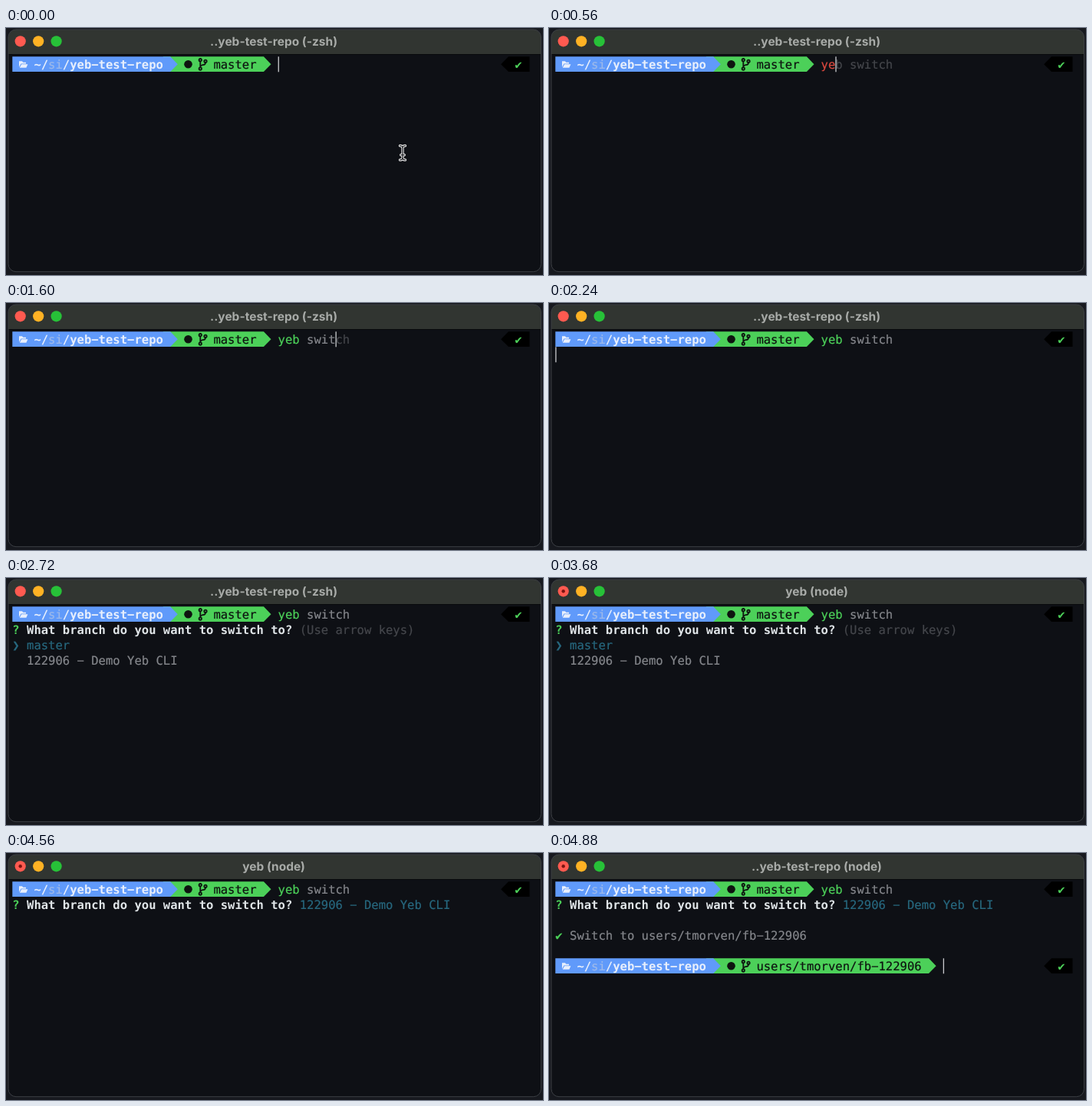
An HTML page for the animation above (5120 ms loop, 700 by 322 pixels).

```html
<!DOCTYPE html>
<html lang="en">
<head>
<meta charset="utf-8">
<title>Terminal branch switch</title>
<style>
  html, body { margin: 0; width: 100%; height: 100%; overflow: hidden; background: #17191f; }
  svg { display: block; }
  text { white-space: pre; text-rendering: geometricPrecision; }
  .mono { font: 15.55px "DejaVu Sans Mono", monospace; }
  .bold { font-weight: 700; }
  #title { font: 700 15.5px Inter, sans-serif; fill: #a8aba8; text-anchor: middle; }
</style>
</head>
<body>
<svg width="700" height="322" viewBox="0 0 700 322">
  <defs>
    <path id="beam" d="M513.5 153.5q3.5 0 3.5 3V169q0 3-3.5 3M520.5 153.5q-3.5 0-3.5 3V169q0 3 3.5 3M514.7 165.5h4.6"/>
  </defs>
  <rect x="3" y="2" width="694.5" height="315.7" rx="10" fill="#0e1015"/>
  <path d="M3 34V12a10 10 0 0 1 10-10H687.5a10 10 0 0 1 10 10V34Z" fill="#313531"/>
  <path d="M3 34.5H697.5" stroke="#08090b"/>
  <rect x="3" y="2" width="694.5" height="315.7" rx="10" fill="none" stroke="#3c3f44"/>
  <circle cx="18.7" cy="17.3" r="7.1" fill="#ff5a50"/>
  <circle id="dot" cx="18.7" cy="17.3" r="2.2" fill="#7a1410"/>
  <circle cx="42.2" cy="17.3" r="7.1" fill="#ffb224"/>
  <circle cx="65.6" cy="17.3" r="7.1" fill="#27c138"/>
  <text id="title" x="349" y="22.5"></text>
  <g id="screen"></g>
  <g id="mouse" fill="none" stroke-linecap="round">
    <use href="#beam" stroke="#e4e4e4" stroke-width="3.4"/>
    <use href="#beam" stroke="#15171b" stroke-width="1.2"/>
  </g>
</svg>
<script>
const LOOP = 5120, CELL = 9.36, LINE = 20;
const GREEN = '#4cd059', BLUE = '#609afa', GRAY = '#85878c', DIM = '#45474c', INK = '#0e1410',
      TEAL = '#27687f', WHITE = '#e0e5e8', PALE = '#e8effc', RED = '#d8483f';
const TOOL = 'yeb', COMMAND = 'yeb switch', REPO = 'yeb-test-repo';
const TASK = '122906 − Demo Yeb CLI', BRANCH = 'users/tmorven/fb−122906';
// Times at which each character of the command is typed.
const KEYS = [240, 560, 640, 800, 1200, 1440, 1520, 1600, 1840, 1920];
const ENTER = 2240, MENU = 2720, RENAME = 2880, MOVE = 3760, ANSWER = 4480, DONE = 4640;

const $ = id => document.getElementById(id);
const colX = col => 8.3 + col * CELL;
const rowY = row => 37.3 + row * LINE;

// A hairline stroke in the text colour gives the strokes their smoothed weight.
const write = (col, row, str, fill, bold = false) =>
  `<text class="mono${bold ? ' bold' : ''}" x="${colX(col)}" y="${rowY(row) + 15.3}"
    fill="${fill}" stroke="${fill}" stroke-width="${bold ? 0 : .2}">${str}</text>`;

const caret = (col, row) =>
  `<rect x="${colX(col)}" y="${rowY(row)}" width="1.3" height="${LINE}" fill="#c9cbce"/>`;

// Segment with a pointed right end.
const arrow = (from, to, fill) =>
  `<path d="M${colX(from)} 0H${colX(to)}l9.6 9.9-9.6 9.9H${colX(from)}Z" fill="${fill}"/>`;

function prompt(row, branch) {
  const end = 29 + branch.length;
  return `<g transform="translate(0 ${rowY(row)})">
      ${arrow(21, end, GREEN)}${arrow(0, 22, BLUE)}
      <path d="M17 6h4l1.3 1.5h3.7v1.8h-6.5l-2.5 4.5ZM20.2 10h8.2l-2 4.5h-8.6Z" fill="${PALE}"/>
      <circle cx="237.5" cy="10" r="5.3" fill="${INK}"/>
      <g fill="none" stroke="${INK}" stroke-width="1.8">
        <circle cx="253.3" cy="4.4" r="1.7"/><circle cx="253.3" cy="15.8" r="1.7"/>
        <circle cx="260" cy="6" r="1.7"/><path d="M253.3 6v8.2M260 7.6q0 3-3.2 3.3t-3.5 2.4"/>
      </g>
      <path d="M682.5 0H655l-9.8 9.9 9.8 9.9H682.5Z" fill="#000"/>
      <text class="mono" x="668" y="15.3" fill="${GREEN}" text-anchor="middle">✔</text>
    </g>` +
    write(3, row, '~/', PALE, true) + write(5, row, 'si', '#9db9ea') +
    write(7, row, '/' + REPO.replaceAll('-', '−'), PALE, true) +
    write(28, row, branch, INK);
}

function commandLine(typed) {
  const valid = typed >= TOOL.length;
  return write(37, 0, COMMAND.slice(0, Math.min(typed, 3)), valid ? GREEN : RED) +
    (typed > 4 ? write(41, 0, COMMAND.slice(4, typed), GRAY) : '') +
    (typed ? write(37 + typed, 0, COMMAND.slice(typed), DIM) : '');
}

function menu(t) {
  const moved = t >= MOVE;
  return (moved ? '' : write(40, 1, '(Use arrow keys)', DIM)) +
    write(0, moved ? 3 : 2, '❯', TEAL) +
    write(2, 2, 'master', moved ? GRAY : TEAL) +
    write(2, 3, TASK, moved ? TEAL : GRAY);
}

function screen(t) {
  const typed = KEYS.filter(k => t >= k).length;
  let out = prompt(0, 'master') + commandLine(typed);
  if (t < ENTER) return out + caret(37 + typed, 0);
  if (t < MENU) return out + caret(0, 1);
  out += write(0, 1, '?', GREEN, true) +
    write(2, 1, 'What branch do you want to switch to?', WHITE, true);
  if (t < ANSWER) return out + menu(t);
  out += write(40, 1, TASK, TEAL);
  if (t < DONE) return out;
  return out + write(0, 3, '✔', GREEN) + write(2, 3, 'Switch to ' + BRANCH, GRAY) +
    prompt(5, BRANCH) + caret(31 + BRANCH.length, 5);
}

let shown = '';
function render(t) {
  const content = screen(t);
  if (content !== shown) $('screen').innerHTML = shown = content;
  $('title').textContent = t < RENAME ? `..${REPO} (-zsh)`
    : t < DONE ? `${TOOL} (node)` : `..${REPO} (node)`;
  $('dot').style.display = t < RENAME ? 'none' : '';
  $('mouse').style.display = t < KEYS[0] ? '' : 'none';
}

const start = performance.now();
function tick() {
  render((performance.now() - start) % LOOP);
  requestAnimationFrame(tick);
}
tick();
</script>
</body>
</html>
```
